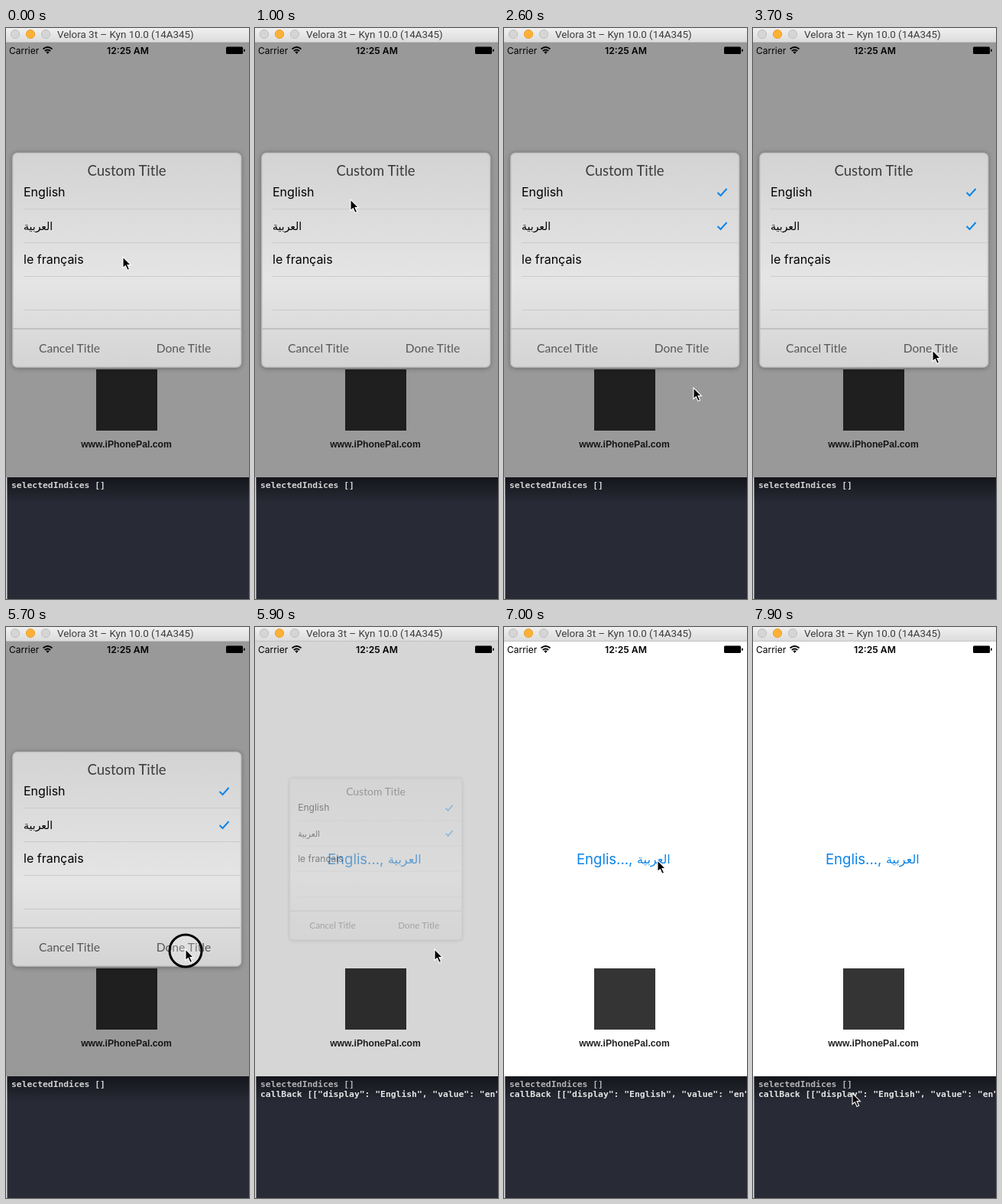
Animation of 318 by 746 pixels, one loop 8000 ms. Source, as an HTML page:

```html
<!DOCTYPE html>
<html lang="en">
<head>
<meta charset="utf-8">
<title>Picker dialog</title>
<style>
html, body { margin: 0; width: 318px; height: 746px; overflow: hidden; background: #fff; }
svg { display: block; }
text { font-family: Inter, Roboto, sans-serif; white-space: pre; }
.lato { font-family: Lato, "Open Sans", sans-serif; }
.arabic { font-family: "DejaVu Sans", sans-serif; }
.mono { font: bold 11.35px "DejaVu Sans Mono", "Noto Sans Mono", monospace; }
.check { fill: none; stroke: #0b84e8; stroke-width: 2; }
</style>
</head>
<body>
<svg width="318" height="746" viewBox="0 0 318 746">
  <defs>
    <linearGradient id="bar" x2="0" y2="1">
      <stop stop-color="#f0f0f0"/><stop offset="1" stop-color="#dcdcdc"/>
    </linearGradient>
    <linearGradient id="panel" x2="0" y2="1">
      <stop stop-color="#d3d3d3"/><stop offset=".6" stop-color="#e5e5e5"/><stop offset="1" stop-color="#d4d4d4"/>
    </linearGradient>
    <linearGradient id="shade" x2="0" y2="1">
      <stop stop-opacity=".5"/><stop offset="1" stop-opacity="0"/>
    </linearGradient>
    <filter id="blur" x="-10%" y="-10%" width="120%" height="120%"><feGaussianBlur stdDeviation="3"/></filter>
  </defs>

  <!-- phone screen -->
  <rect y="18" width="318" height="569" fill="#fff"/>
  <text x="4" y="33.5" font-size="12">Carrier</text>
  <g fill="none" stroke="#000" stroke-width="1.9">
    <path d="M48.5 27.5Q54.5 22.5 60.5 27.5M50.8 30Q54.5 27 58.2 30"/>
    <path d="M52.3 31.2Q54.5 29.8 56.7 31.2L54.5 34Z" fill="#000" stroke="none"/>
  </g>
  <text x="159.5" y="33.5" font-size="12.2" font-weight="600" text-anchor="middle">12:25 AM</text>
  <rect x="288" y="24.5" width="22" height="9.5" rx="1.5"/>
  <rect x="311" y="27.5" width="1.6" height="3.5" rx=".8"/>
  <g id="label" fill="#0b84e8">
    <text x="95" y="310" font-size="18.5">Englis...,</text>
    <text class="arabic" x="174" y="309" font-size="16">العربية</text>
  </g>
  <rect x="118" y="446" width="80" height="80" fill="#343435"/>
  <text x="157.5" y="548" font-size="12.2" font-weight="bold" fill="#222" text-anchor="middle" style="font-family:'Liberation Sans',Arial,sans-serif">www.iPhonePal.com</text>
  <rect id="dim" y="18" width="318" height="569"/>

  <!-- dialog -->
  <g id="dialog">
    <rect x="8" y="163" width="300" height="282" rx="7" opacity=".3" filter="url(#blur)"/>
    <rect x="9" y="163.5" width="298.5" height="279.5" rx="6" fill="url(#panel)" stroke="#c4c4c4" stroke-width="1.6"/>
    <path d="M23 236.5H307M23 280.5H307M23 324.5H307M23 368.5H307" stroke="#cbcbcb"/>
    <path d="M9 393H307" stroke="#b9b9b9" stroke-width="1.5"/>
    <g class="lato" fill="#3b3b3b" text-anchor="middle">
      <text class="lato" x="158" y="193" font-size="18.5">Custom Title</text>
      <g fill="#585858" font-size="15.6">
        <text class="lato" x="83" y="424">Cancel Title</text>
        <text class="lato" x="232.5" y="424">Done Title</text>
      </g>
    </g>
    <g font-size="16">
      <text x="23" y="220">English</text>
      <text class="arabic" x="23" y="264" font-size="14">العربية</text>
      <text x="23" y="308">le français</text>
    </g>
    <path id="check1" class="check" d="M279.5 215L283.5 219L291.5 210"/>
    <path id="check2" class="check" d="M279.5 259L283.5 263L291.5 254"/>
  </g>

  <!-- window title bar -->
  <rect width="318" height="18" fill="url(#bar)"/>
  <path d="M0 18.5H318" stroke="#c2c2c2"/>
  <g fill="#d5d5d5" stroke="#bfbfbf">
    <circle cx="12" cy="8" r="5.6"/>
    <circle cx="32" cy="8" r="5.6" fill="#fcb136" stroke="#e9a02c"/>
    <circle cx="52" cy="8" r="5.6"/>
  </g>
  <text x="67" y="13" font-size="13.4" fill="#3c3c3c" style="font-family:Roboto,Inter,sans-serif">Velora 3t – Kyn 10.0 (14A345)</text>

  <!-- console -->
  <rect y="587" width="318" height="159" fill="#dcdce0"/>
  <rect x="1.5" y="587" width="317" height="159" fill="#282b36"/>
  <rect x="1.5" y="587" width="317" height="34" fill="url(#shade)"/>
  <text id="line1" class="mono" x="7" y="601">selectedIndices []</text>
  <text id="line2" class="mono" x="7" y="614" fill="#e6e6e6">callBack [["display": "English", "value": "en"</text>

  <circle id="ring" r="21" fill="#fff" fill-opacity=".2" stroke="#000" stroke-width="3"/>
  <path id="cursor" d="M0 0V14.5L3.4 11.6L6 17.4L8.6 16.2L6 10.6H10.4Z" stroke="#fff" stroke-width="1.1"/>
</svg>
<script>
const LOOP = 8000, STEP = 100;
const el = id => document.getElementById(id);
const show = (id, on) => el(id).setAttribute('visibility', on ? 'visible' : 'hidden');
const set = (id, name, value) => el(id).setAttribute(name, value);
const clamp = v => Math.min(1, Math.max(0, v));

// time, x, y of the pointer tip
const path = [
  [0, 153, 299], [900, 125, 224], [1400, 125, 224], [1700, 126, 248],
  [2100, 126, 248], [2600, 248, 470], [3000, 235, 426], [3300, 234, 424],
  [3500, 234, 424], [3700, 235, 421], [6200, 235, 421], [6700, 206, 310],
  [7100, 200, 304], [7500, 150, 644], [7900, 130, 609], [8000, 130, 609]
];
const clicks = [[1100, 1300], [1800, 2000], [5700, 5900]];

function pointer(t) {
  const i = path.findIndex(k => k[0] > t);
  const [t0, x0, y0] = path[i - 1], [t1, x1, y1] = path[i];
  const p = (t - t0) / (t1 - t0), e = p * p * (3 - 2 * p);
  return [x0 + (x1 - x0) * e, y0 + (y1 - y0) * e];
}

function draw(t) {
  const [x, y] = pointer(t);
  set('cursor', 'transform', `translate(${x} ${y})`);
  set('ring', 'transform', `translate(${x} ${y + 2})`);
  show('ring', clicks.some(([from, to]) => t >= from && t < to));
  show('check1', t >= 1200);
  show('check2', t >= 1900);

  const gone = clamp((t - 5780) / 200);
  set('dim', 'opacity', 0.4 * (1 - gone));
  set('dialog', 'opacity', 1 - gone);
  set('dialog', 'transform', `translate(158 303) scale(${1 - 0.41 * gone}) translate(-158 -303)`);

  const done = t >= 5800;
  show('label', done);
  show('line2', done);
  set('line1', 'fill', done ? '#b4b4b4' : '#d2d2d2');
}

const start = performance.now();
function frame() {
  const t = (performance.now() - start) % LOOP;
  draw(Math.floor(t / STEP) * STEP);
  requestAnimationFrame(frame);
}
draw(0);
requestAnimationFrame(frame);
</script>
</body>
</html>
```
